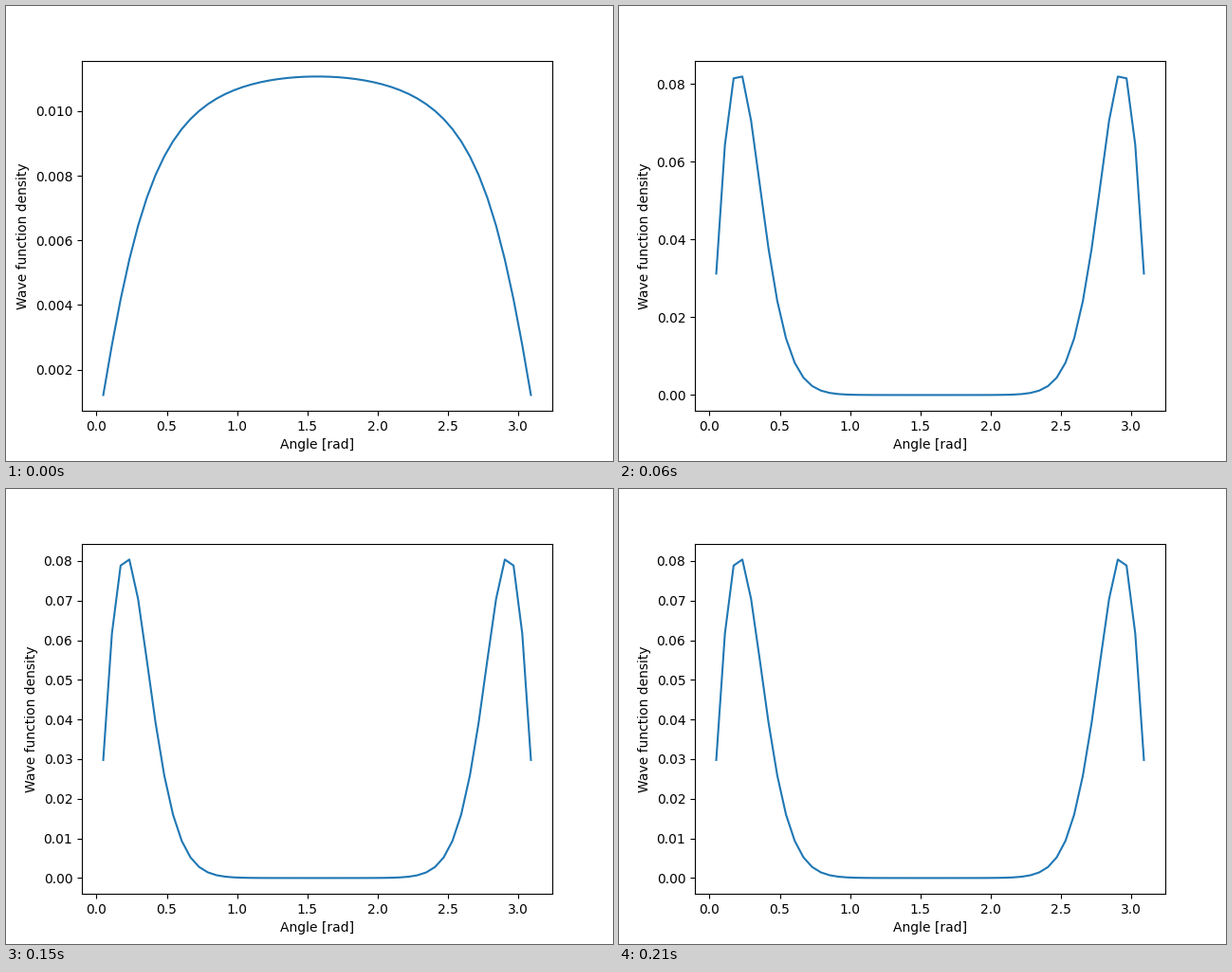
A matplotlib script that plays this animation: 640 by 480 pixels, repeating every 1950 ms.

```python
import numpy as np
import matplotlib.pyplot as plt
from matplotlib.animation import FuncAnimation

INTERVAL = 30
FRAMES = 65
LAST_STEP = 7

# Gauss-Legendre quadrature over cos(theta)
nodes, weights = np.polynomial.legendre.leggauss(50)
theta = np.arccos(nodes)
sin2 = 1 - nodes ** 2
potential = sin2 - 0.3 * sin2 ** 2 + 0.4 * sin2 ** 3


def initial_guess():
    return 0.178 / np.sqrt(1 - 0.82 * nodes ** 2)


def aligned(strength):
    """Distribution peaked at both poles; a stronger field is narrower."""
    height = 16.08 * (strength / 17.9) ** 1.06
    return height * np.exp(-strength * potential)


def density(step):
    """Weighted density while the field strength converges."""
    if step == 0:
        return weights * initial_guess()
    return weights * aligned(12 + 5.6 * 0.1 ** (step - 1))


fig, ax = plt.subplots(figsize=(6.4, 4.8), dpi=100)


def draw(frame):
    ax.clear()
    line, = ax.plot(theta, density(min(frame, LAST_STEP)), color="#1f77b4")
    ax.set_xlabel("Angle [rad]")
    ax.set_ylabel("Wave function density")
    return line,


anim = FuncAnimation(fig, draw, frames=FRAMES, interval=INTERVAL,
                     init_func=lambda: draw(0), repeat=True, repeat_delay=0)
plt.show()
```
